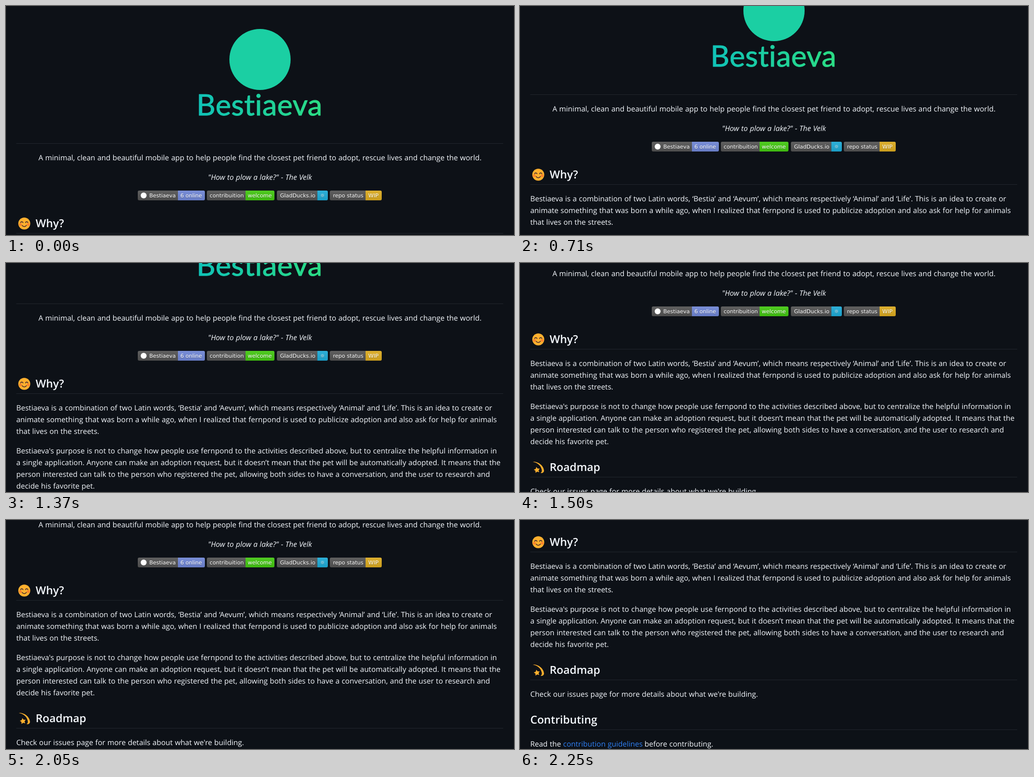
These frames come from a looping animation (1037x469 px, 3300 ms). An HTML page with a canvas:

```html
<!DOCTYPE html>
<html lang="en">
<head>
<meta charset="utf-8">
<title>Readme scroll</title>
<style>
  html, body { margin: 0; width: 100%; height: 100%; overflow: hidden; background: #0d1117; }
  canvas { display: block; width: 1037px; height: 469px; }
</style>
</head>
<body>
<canvas id="stage" width="1037" height="469"></canvas>
<script>
const W = 1037, H = 469, LOOP = 3300;
const ctx = document.getElementById('stage').getContext('2d');

const BG = '#0d1117', INK = '#f6faff', RULE = '#21262d', LINK = '#2f81f7', GOLD = '#ffb02e', DARK = '#402a32';
const SANS = '"Open Sans", "Noto Sans", sans-serif';
const BODY = '15.05px ' + SANS;
const ITALIC = 'italic 15.05px ' + SANS;
const HEAD = '600 22.4px ' + SANS;
const BADGE = '11px "DejaVu Sans", sans-serif';
const MARK = '400 60px Lato, sans-serif';
const LEFT = 21, RIGHT = 1015, MID = 518.5;

// [time in ms, scroll offset]: three flicks of the wheel
const SCROLL = [
  [0, 0],
  [500, 23], [570, 74], [640, 97], [710, 100],
  [1240, 108], [1300, 150], [1370, 198], [1430, 247], [1500, 289], [1570, 300],
  [2050, 301], [2120, 341], [2180, 386], [2250, 400]
];

const WHY = [
  [500, 'Bestiaeva is a combination of two Latin words, ‘Bestia’ and ‘Aevum’, which means respectively ‘Animal’ and ‘Life’. This is an idea to create or'],
  [524, 'animate something that was born a while ago, when I realized that fernpond is used to publicize adoption and also ask for help for animals'],
  [548, 'that lives on the streets.'],
  [588, 'Bestiaeva\'s purpose is not to change how people use fernpond to the activities described above, but to centralize the helpful information in'],
  [612, 'a single application. Anyone can make an adoption request, but it doesn’t mean that the pet will be automatically adopted. It means that the'],
  [636, 'person interested can talk to the person who registered the pet, allowing both sides to have a conversation, and the user to research and'],
  [660, 'decide his favorite pet.']
];

// x, split, end, label, value, value colour, label centre, value centre
const BADGES = [
  [269, 351, 406, 'Bestiaeva', '6 online', '#7289da', 319.5, 378],
  [410, 489, 548, 'contribuition', 'welcome', '#44cc11', 450.5, 518],
  [553, 635.5, 657, 'GladDucks.io', '☼', '#1eaedb', 595.5, 646],
  [661, 734, 767, 'repo status', 'WIP', '#e0ae20', 698.5, 750]
];

function text(str, x, y, font = BODY, fill = INK, align = 'left') {
  ctx.font = font;
  ctx.fillStyle = fill;
  ctx.textAlign = align;
  ctx.wordSpacing = font === BADGE ? '0px' : '0.42px';
  ctx.fillText(str, x, y);
  return ctx.measureText(str).width;
}

function disc(x, y, r, fill) {
  ctx.fillStyle = fill;
  ctx.beginPath();
  ctx.arc(x, y, r, 0, Math.PI * 2);
  ctx.fill();
}

function arc(x, y, r, from, to) {
  ctx.beginPath();
  ctx.arc(x, y, r, from * Math.PI, to * Math.PI);
  ctx.stroke();
}

function rule(y) {
  ctx.fillStyle = RULE;
  ctx.fillRect(LEFT, y, RIGHT - LEFT, 1);
}

function heading(str, x, y) {
  text(str, x, y, HEAD);
  rule(y + 12);
}

function banner() {
  disc(518.5, 109.5, 62.5, '#1bcfa3');
  const tint = ctx.createLinearGradient(388, 0, 647, 0);
  tint.addColorStop(0, '#0fc2b8');
  tint.addColorStop(1, '#2bdd83');
  ctx.save();
  ctx.letterSpacing = '0.5px';
  text('Bestiaeva', 517.5, 223.5, MARK, tint, 'center');
  // a thin round outline softens the corners
  ctx.strokeStyle = tint;
  ctx.lineWidth = 1;
  ctx.lineJoin = 'round';
  ctx.strokeText('Bestiaeva', 517.5, 223.5);
  ctx.restore();
}

function badge([x, split, end, label, value, color, labelX, valueX]) {
  const y = 378;
  ctx.save();
  ctx.beginPath();
  ctx.roundRect(x, y, end - x, 20, 3);
  ctx.clip();
  ctx.fillStyle = '#555';
  ctx.fillRect(x, y, split - x, 20);
  ctx.fillStyle = color;
  ctx.fillRect(split, y, end - split, 20);
  const shade = ctx.createLinearGradient(0, y, 0, y + 20);
  shade.addColorStop(0, 'rgba(187,187,187,.1)');
  shade.addColorStop(1, 'rgba(0,0,0,.1)');
  ctx.fillStyle = shade;
  ctx.fillRect(x, y, end - x, 20);
  ctx.restore();
  for (const [str, cx] of [[label, labelX], [value, valueX]]) {
    text(str, cx, y + 15, BADGE, 'rgba(1,1,1,.3)', 'center');
    text(str, cx, y + 14, BADGE, '#fff', 'center');
  }
}

function smiley(x, y) {
  disc(x, y, 12.2, GOLD);
  disc(x - 8, y + 2, 2.7, '#ff822d');
  disc(x + 8, y + 2, 2.7, '#ff822d');
  ctx.strokeStyle = DARK;
  ctx.lineWidth = 1.5;
  ctx.lineCap = 'round';
  arc(x - 5, y - 1, 2.6, 1.1, 1.9);
  arc(x + 5, y - 1, 2.6, 1.1, 1.9);
  arc(x, y + 1, 5.2, 0.17, 0.83);
}

function shootingStar(x, y) {
  ctx.fillStyle = GOLD;
  ctx.beginPath();
  ctx.moveTo(x + 1, y + 2);
  ctx.bezierCurveTo(x + 13, y + 1, x + 24, y + 11, x + 24, y + 21);
  ctx.quadraticCurveTo(x + 23, y + 26, x + 17, y + 25);
  ctx.quadraticCurveTo(x + 21, y + 22, x + 19, y + 17);
  ctx.bezierCurveTo(x + 17, y + 9, x + 10, y + 4, x + 1, y + 2);
  ctx.fill();
  ctx.beginPath();
  for (let i = 0; i < 10; i++) {
    const r = i % 2 ? 3.4 : 6.4, a = i * Math.PI / 5 - 1.75;
    ctx.lineTo(x + 9.5 + r * Math.cos(a), y + 19 + r * Math.sin(a));
  }
  ctx.fill();
}

function page() {
  banner();
  rule(281);
  text('A minimal, clean and beautiful mobile app to help people find the closest pet friend to adopt, rescue lives and change the world.', MID, 316, BODY, INK, 'center');
  text('"How to plow a lake?" - The Velk', MID, 356, ITALIC, INK, 'center');
  BADGES.forEach(badge);
  disc(281, 388, 6, '#fff');

  smiley(37.3, 445.5);
  heading('Why?', 60.5, 453);
  for (const [y, line] of WHY) text(line, LEFT, y);

  shootingStar(25, 694);
  heading('Roadmap', 60.5, 715);
  text('Check our issues page for more details about what we\'re building.', LEFT, 762);

  heading('Contributing', LEFT, 817);
  let x = LEFT;
  x += text('Read the ', x, 864);
  x += text('contribution guidelines', x, 864, BODY, LINK);
  text(' before contributing.', x, 864);
}

function offsetAt(t) {
  let offset = 0;
  for (const [time, value] of SCROLL) if (t >= time) offset = value;
  return offset;
}

let shown = -1;
const start = performance.now();

function tick() {
  const offset = offsetAt((performance.now() - start) % LOOP);
  if (offset !== shown) {
    shown = offset;
    ctx.fillStyle = BG;
    ctx.fillRect(0, 0, W, H);
    ctx.save();
    ctx.translate(0, -offset);
    page();
    ctx.restore();
  }
  requestAnimationFrame(tick);
}

ctx.textRendering = 'geometricPrecision';
tick();
</script>
</body>
</html>
```
